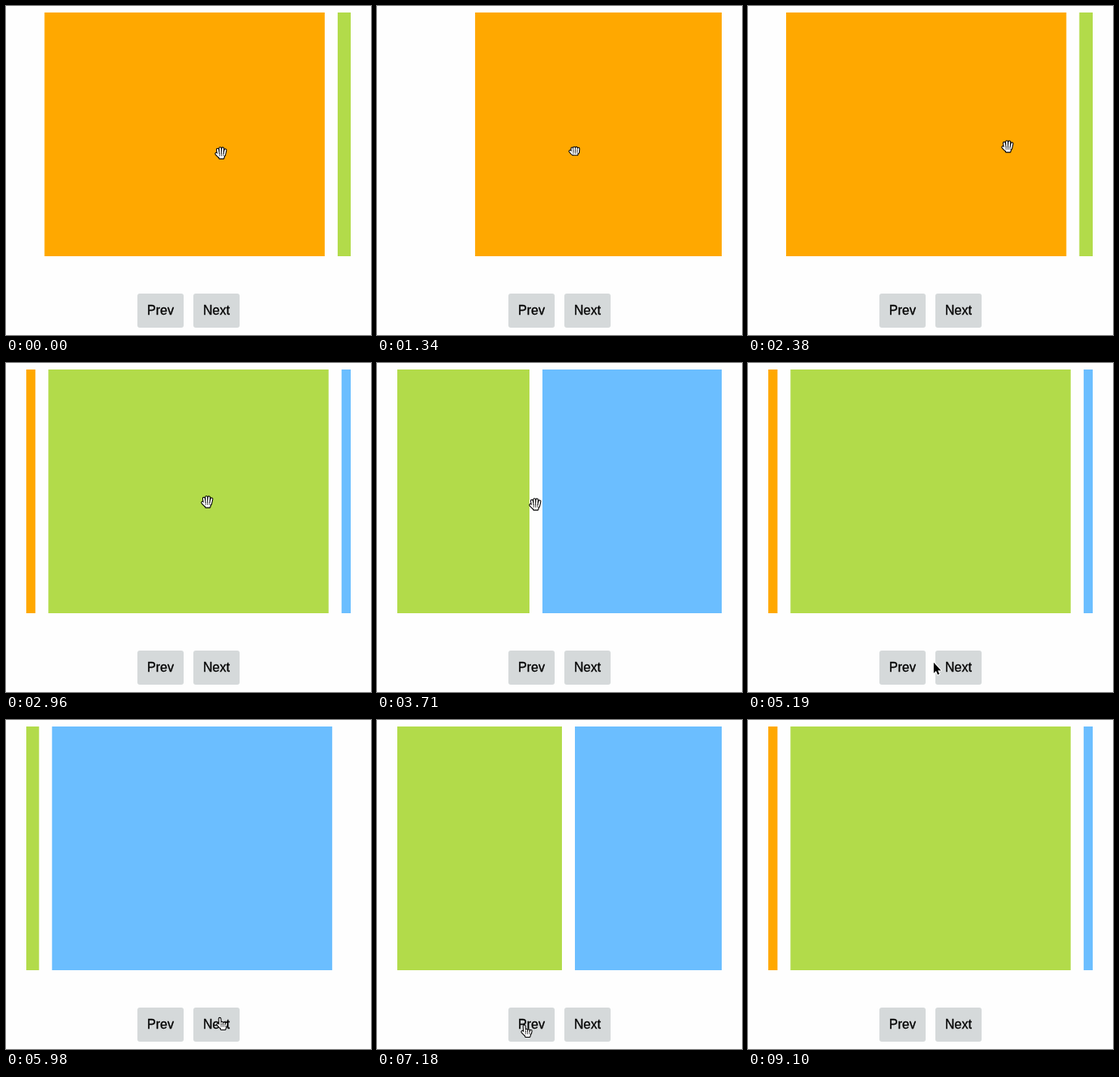
Write an HTML page with a canvas that moves like this. It is 450 px wide and 405 px high and loops after 9960 ms.

```html
<!DOCTYPE html>
<html lang="en">
<head>
<meta charset="utf-8">
<title>Carousel</title>
<style>
  html, body { margin: 0; width: 100%; height: 100%; overflow: hidden; background: #fefefe; }
  canvas { display: block; }
</style>
</head>
<body>
<canvas id="stage" width="450" height="405"></canvas>
<script>
const ctx = document.getElementById('stage').getContext('2d');
const LOOP = 9960, EXIT = 9100;
const VIEW = { x: 25, y: 8, w: 400, h: 300 };
const GAP = 16, SLIDE = (VIEW.w - 20) / 1.1, PITCH = SLIDE + GAP;
const COLORS = ['#ffa800', '#b2db4a', '#6bbeff'];
const BUTTON = { y: 354, w: 57, h: 42 };
const BUTTONS = [{ x: 162, label: 'Prev' }, { x: 231, label: 'Next' }];
const restOf = slide => 47 - 356.1 * slide;

const glides = [], moves = [];
const glide = (start, end, x, y) => glides.push({ start, end, x, y });
const click = (time, slide) => moves.push({ start: time, end: time, slide });
function drag(start, end, x, y, slide) {
  glide(start, end, x, y);
  moves.push({ start, end, slide });
}

click(-310, 0);
glide(340, 680, 96, 187);
drag(700, 1500, 261, 177, 0);
glide(1600, 2200, 320, 173);
drag(2400, 2600, 248, 171, 1);
drag(3440, 3650, 195, 174, 2);
glide(3760, 4400, 196, 380);
click(4770, 1);
glide(4850, 5500, 267, 374);
click(5747, 2);
glide(6180, 6620, 185, 383);
click(7119.4, 1);
glide(7250, 7720, 277, 106);
glide(8670, EXIT, 382, 420);

function pointerAt(t) {
  let x = 265, y = 181;
  for (const g of glides) {
    if (t < g.start) break;
    const p = Math.min(1, (t - g.start) / (g.end - g.start));
    const eased = p * p * (3 - 2 * p);
    x += (g.x - x) * eased;
    y += (g.y - y) * eased;
  }
  return [x, y];
}

// Distance left to travel, from 1 to 0, on a slightly underdamped spring
function spring(ms) {
  const tau = ms * 0.027, damping = 0.88;
  const wave = Math.sqrt(1 - damping * damping);
  return Math.exp(-damping * tau) *
    (Math.cos(wave * tau) + damping / wave * Math.sin(wave * tau));
}

function trackAt(t) {
  const edge = restOf(0);
  let x = restOf(1);
  for (const { start, end, slide } of moves) {
    if (t < start) break;
    if (end > start) {
      x += pointerAt(Math.min(t, end))[0] - pointerAt(start)[0];
      if (x > edge) x = edge + (x - edge) / 2;
    }
    if (t < end) break;
    x = restOf(slide) + (x - restOf(slide)) * spring(t - end);
  }
  return x;
}

function makeHand(fan, reach, bottom) {
  const fingers = new Path2D(), palm = new Path2D(), creases = new Path2D();
  for (let i = 0; i < 4; i++) {
    const x = -3 + 2.4 * i;
    fingers.moveTo(x, 2);
    fingers.lineTo(x + (i - 1.4) * fan, -reach(i));
    if (i === 3) break;
    creases.moveTo(x + 1.2, 0.5);
    creases.lineTo(x + 1.2, 3.5);
  }
  fingers.moveTo(-2.8, 4);
  fingers.lineTo(-5.7, 0.9);
  palm.moveTo(-3.6, 1);
  palm.lineTo(5, 1);
  palm.lineTo(3.2, bottom);
  palm.lineTo(-1.8, bottom);
  palm.closePath();
  return { fingers, palm, creases };
}

const OPEN = makeHand(0.8, i => 6 - 0.9 * (i - 1.4) ** 2, 6.6);
const CLOSED = makeHand(0.2, i => 3.4 - 0.4 * (i - 1.4) ** 2, 5.2);
const POINT = makeHand(0.3, i => i ? 1.9 - 0.6 * i : 6.2, 7);

function strokePath(path, color, width) {
  ctx.strokeStyle = color;
  ctx.lineWidth = width;
  ctx.stroke(path);
}

function drawHand({ fingers, palm, creases }) {
  strokePath(fingers, '#000', 3.9);
  strokePath(palm, '#000', 2.2);
  ctx.fillStyle = '#fff';
  ctx.fill(palm);
  strokePath(fingers, '#fff', 1.8);
  strokePath(creases, '#000', 0.7);
}

function drawArrow() {
  const arrow = new Path2D('M-5-8V5L-2 2.3 0 7 2 6 0 1.6H4Z');
  strokePath(arrow, '#fff', 2);
  ctx.fillStyle = '#000';
  ctx.fill(arrow);
}

function drawPointer(t) {
  const [x, y] = pointerAt(t);
  const tipX = x - 3, tipY = y - 7;
  const overButton = tipY >= BUTTON.y && tipY <= BUTTON.y + BUTTON.h &&
    BUTTONS.some(b => tipX >= b.x && tipX <= b.x + BUTTON.w);
  const dragging = moves.some(m => m.start <= t && t < m.end);
  ctx.save();
  ctx.translate(x, y);
  ctx.lineCap = ctx.lineJoin = 'round';
  if (overButton) drawHand(POINT);
  else if (y < VIEW.y + VIEW.h) drawHand(dragging ? CLOSED : OPEN);
  else drawArrow();
  ctx.restore();
}

function drawSlides(t) {
  const track = trackAt(t);
  ctx.save();
  ctx.beginPath();
  ctx.rect(VIEW.x, VIEW.y, VIEW.w, VIEW.h);
  ctx.clip();
  COLORS.forEach((color, i) => {
    ctx.fillStyle = color;
    ctx.fillRect(track + i * PITCH, VIEW.y, SLIDE, VIEW.h);
  });
  ctx.restore();
}

function drawButtons() {
  ctx.font = '16px "Liberation Sans", Arial, sans-serif';
  ctx.lineWidth = 0.3;
  ctx.strokeStyle = '#000';
  for (const { x, label } of BUTTONS) {
    ctx.fillStyle = '#d5d9da';
    ctx.beginPath();
    ctx.roundRect(x, BUTTON.y, BUTTON.w, BUTTON.h, 3);
    ctx.fill();
    ctx.fillStyle = '#000';
    ctx.fillText(label, x + 12, 380);
    ctx.strokeText(label, x + 12, 380);
  }
}

function draw(now) {
  const t = now % LOOP;
  ctx.fillStyle = '#fefefe';
  ctx.fillRect(0, 0, 450, 405);
  drawSlides(t);
  drawButtons();
  if (t < EXIT) drawPointer(t);
}

let start;
function tick(now) {
  start ??= now;
  draw(now - start);
  requestAnimationFrame(tick);
}
draw(0);
requestAnimationFrame(tick);
</script>
</body>
</html>
```
